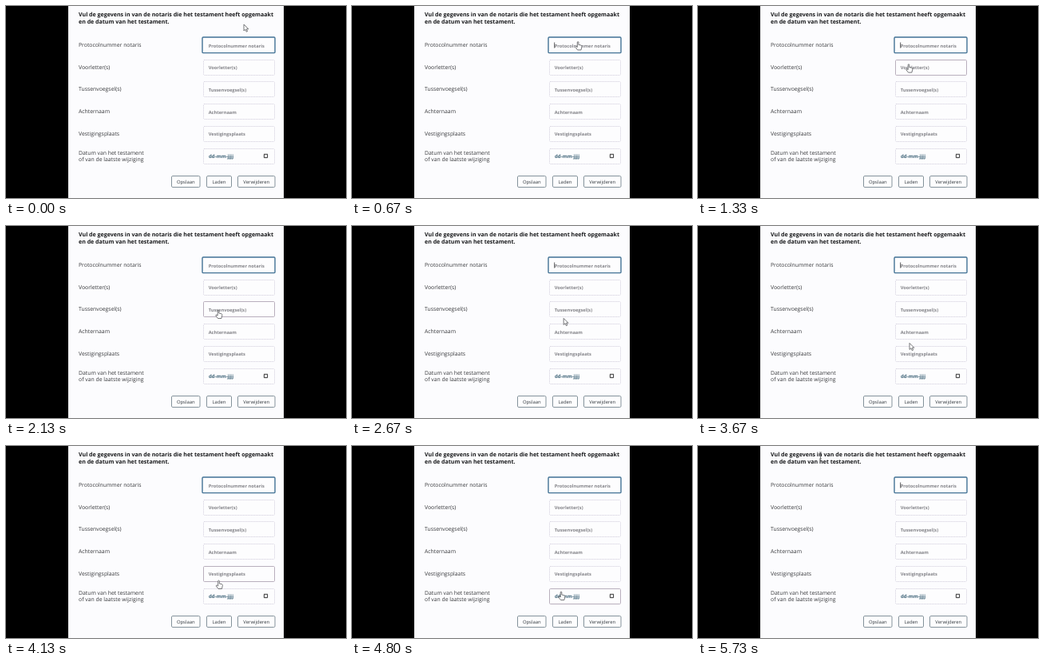
These frames come from a looping animation (426 by 240 pixels, 5790 ms). An HTML page:

```html
<!DOCTYPE html>
<html lang="nl">
<head>
<meta charset="utf-8">
<title>Notarisgegevens</title>
<style>
html, body { margin: 0; width: 100%; height: 100%; overflow: hidden; background: #000; }
svg { display: block; width: 100vw; height: 100vh; }
text { font-family: "Open Sans", "Noto Sans", sans-serif; font-size: 6.85px; fill: #38393c; text-rendering: geometricPrecision; }
.title { font-weight: 700; font-size: 7.05px; fill: #18191b; }
.hint { font-weight: 700; font-size: 5.7px; fill: #85858a; }
.date { font-weight: 700; font-size: 6.1px; fill: #3f6478; }
.button { font-size: 5.9px; text-anchor: middle; fill: #33393f; }
rect { fill: #fdfdfe; stroke-width: 1; }
.field { stroke: #d0ccdc; stroke-dasharray: 1 1; }
.hover { stroke: #b9afbd; stroke-dasharray: none; }
.focus { stroke: #427295; stroke-width: 1.4; stroke-dasharray: none; }
.press { stroke: #84929b; }
.cursor { fill: #fff; stroke: #55565a; stroke-width: .8; stroke-linejoin: round; }
</style>
</head>
<body>
<svg id="stage" viewBox="0 0 426 240">
  <path d="M78 0H348V240H78Z" fill="#fcfcfe"/>
</svg>
<script>
const stage = document.getElementById("stage");
const LOOP = 5790, STEP = 1000 / 15;

function add(tag, attrs, content = "") {
  const node = document.createElementNS("http://www.w3.org/2000/svg", tag);
  for (const key in attrs) node.setAttribute(key, attrs[key]);
  node.textContent = content;
  return stage.appendChild(node);
}
const write = (x, y, content, cls = "") => add("text", { x, y, class: cls }, content);

write(91, 13.4, "Vul de gegevens in van de notaris die het testament heeft opgemaakt", "title");
write(91, 22, "en de datum van het testament.", "title");

const labels = ["Protocolnummer notaris", "Voorletter(s)", "Tussenvoegsel(s)", "Achternaam", "Vestigingsplaats"];
const rowY = i => 49 + i * 27.7;

const fields = [0, 1, 2, 3, 4, 5].map(i => {
  const y = rowY(i);
  const box = add("rect", {
    x: i ? 247.5 : 246, y: Math.round(y - 10) + (i ? .5 : 0),
    width: i ? 89 : 91, height: i ? 19 : 19.6, rx: 1.2, class: i ? "field" : "field focus"
  });
  if (i < 5) {
    write(91, y + 2, labels[i]);
    write(253.7, y + 2.6, labels[i], "hint");
  }
  return box;
});
write(91, 185.8, "Datum van het testament");
write(91, 193.6, "of van de laatste wijziging");
write(254, 189.7, "dd-mm-jjjj", "date");
add("path", { d: "M323.4 185.6V189.6H327.6V185.6M323 185.3H328", fill: "none", stroke: "#222", "stroke-width": .9 });

for (const [x, width, name] of [[207.5, 35.5, "Opslaan"], [251.5, 31, "Laden"], [290.5, 46.5, "Verwijderen"]]) {
  add("rect", { x, y: 212.5, width, height: 14, rx: 1.4, class: "press" });
  write(x + width / 2, 221.5, name, "button");
}

const caret = add("path", { d: "M253.7 45.5V52.5", stroke: "#333", "stroke-width": .8 });

// Each pointer shape has its hot spot at 0,0.
const pointers = {
  arrow: "M0 0V8L1.9 6.3L3.2 9.2L4.6 8.6L3.3 5.8H5.8Z",
  hand: "M-.8 .6Q0 -.5 .8 .6V4L3.8 4.6Q5 5 4.8 6.5L3.9 10.5H-.5L-3.2 7Q-3.3 5.8 -2 6.1L-.8 7Z",
  beam: "M-1.5 -4H1.5M0 -4V4M-1.5 4H1.5"
};
const cursor = add("path", { class: "cursor" });

// time, x, y
const route = [
  [0, 298, 23], [300, 298, 23], [1100, 264, 72], [1500, 264, 73], [2050, 266, 105], [2400, 266, 105],
  [3000, 264, 130], [3400, 264, 131], [4000, 266.5, 168], [4250, 266.5, 168],
  [4700, 262, 182], [5000, 262, 182], [5700, 153.5, 12], [LOOP, 153.5, 12]
];

function position(t) {
  const i = route.findIndex(p => p[0] > t);
  const [t0, x0, y0] = route[i - 1], [t1, x1, y1] = route[i];
  const k = (t - t0) / (t1 - t0), ease = k * k * (3 - 2 * k);
  return [x0 + (x1 - x0) * ease, y0 + (y1 - y0) * ease];
}

function draw(now) {
  const t = Math.floor((now % LOOP + 5) / STEP) * STEP;
  const [x, y] = position(t);
  let over = -1;
  fields.forEach((box, i) => {
    const inside = x > 247 && x < 337 && Math.abs(y - rowY(i)) < 10.2;
    if (inside) over = i;
    box.classList.toggle("hover", i > 0 && inside);
  });
  const shape = over >= 0 ? "hand" : x < 175 && y < 25 ? "beam" : "arrow";
  cursor.setAttribute("d", pointers[shape]);
  cursor.setAttribute("transform", `translate(${x} ${y})`);
  const blink = t % 1000;
  caret.style.visibility = blink >= 300 && blink < 800 ? "visible" : "hidden";
  requestAnimationFrame(draw);
}
requestAnimationFrame(draw);
</script>
</body>
</html>
```
